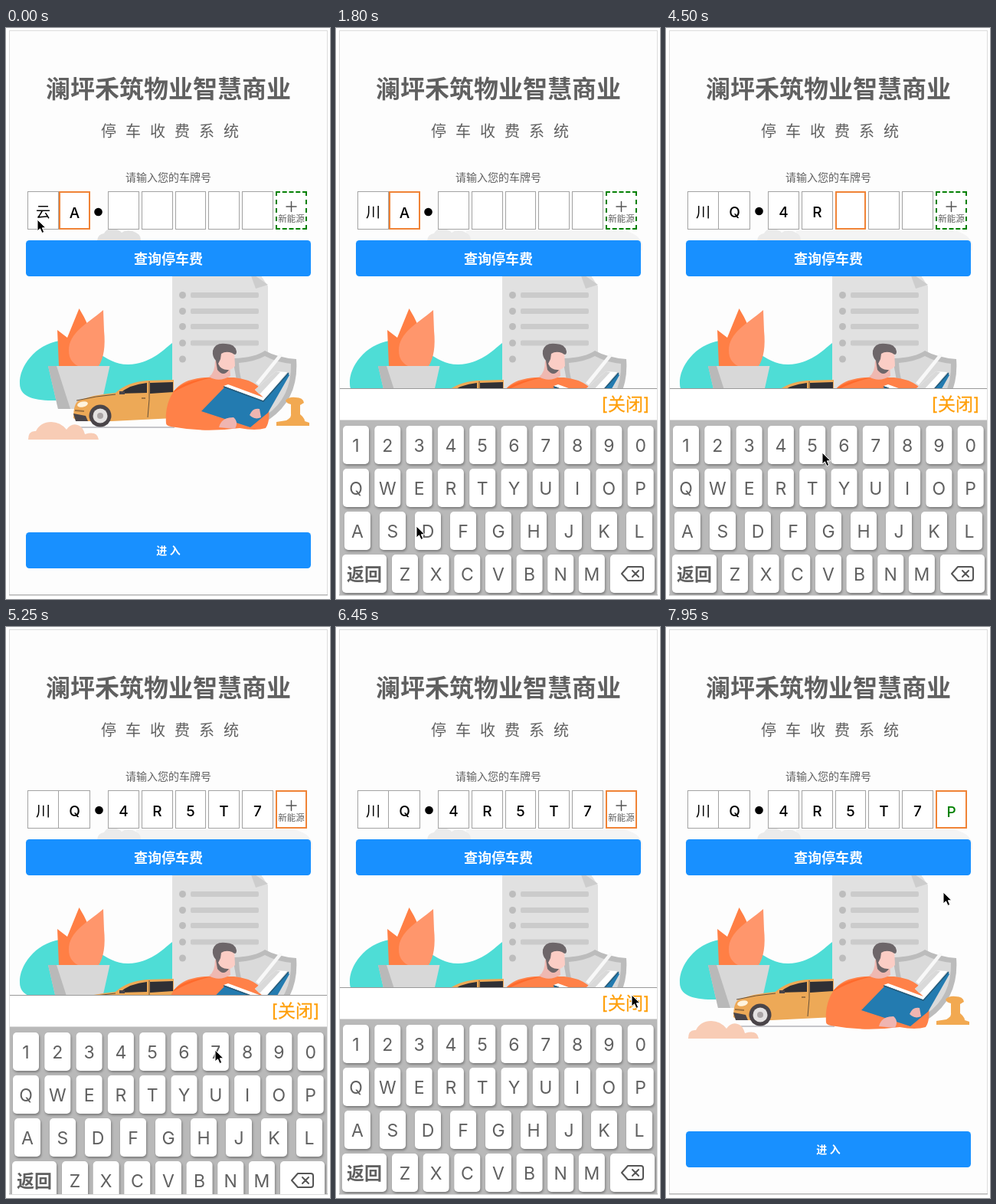
Animation of 423 by 745 pixels, one loop 8 s. Source, as an HTML page:

```html
<!DOCTYPE html>
<html lang="zh-CN">
<head>
<meta charset="utf-8">
<title>停车收费系统</title>
<style>
html, body { margin: 0; width: 100%; height: 100%; overflow: hidden; background: #fff; }
svg { display: block; width: 423px; height: 745px; }
text { font-family: Inter, "Noto Sans CJK SC", "Noto Sans CJK", sans-serif; text-anchor: middle; fill: #606060; }
.keys rect { fill: #fff; filter: drop-shadow(1px 2px 1.5px #0005); }
.icon { fill: none; stroke: #555; stroke-width: 2; stroke-linejoin: round; stroke-linecap: round; }
.cell { box-sizing: border-box; height: 50px; border: 1px solid #a3a3a3; background: #fff; }
.second { border-left: 0; }
.extra { border: 2px dashed green; }
.active { border: 2px solid #f08336; }
</style>
</head>
<body>
<svg viewBox="0 0 423 745">
  <defs><clipPath id="stage"><rect x="5" y="4" width="414" height="736"/></clipPath></defs>
  <rect x="4.5" y="3.5" width="415" height="737" fill="#fdfdfd" stroke="#dcdcdc"/>
  <path d="M4 739.500H420" stroke="#b4b4b4"/>

  <g id="art">
    <path id="haze" fill="#f4f4f4" d="M170 277V264H375Q395 268 400 282V290H170Z"/>
    <path id="cloud" d="M119 277q1-8 9-9q3-7 12-6q8 1 11 5q5-4 14-2q11 3 11 12z"/>
    <path fill="#4eddd6" d="M18 464C17 442 38 413 70 408C112 406 128 440 160 439C188 438 203 422 217 411V486H60C34 486 18 480 18 464Z"/>
    <!-- plant -->
    <path fill="#ff7f45" d="M69 441L67 394L80 404L95.500 366Q109 388 111 402V441Z"/>
    <path fill="#ff966c" d="M127 368C106 386 82 397 82 421Q82 435 94 441H121Q131 425 128 395Z"/>
    <path fill="#d8d8d8" d="M55 441H135.500L123 497H68Z"/>
    <path fill="#b9b9b9" d="M55 441H66L84 497H68Z"/>
    <!-- document -->
    <path fill="#e1e1e1" d="M217 300H318L342 337V480H217Z"/>
    <path fill="#cdcdcd" d="M318 318L326 340L342 335Z"/>
    <g id="list"></g>
    <!-- shield -->
    <path fill="#bcbcbc" d="M297 431Q325 430 338 421Q354 430 379 432Q383 486 340 513Q300 490 297 431Z"/>
    <path fill="#dadada" d="M304 437Q326 435 338 428Q353 436 372 438Q373 482 340 505Q306 484 304 437Z"/>
    <path fill="#f8f8f8" d="M357 425L361 427L330 466L326 463Z"/>
    <!-- car -->
    <path stroke="#c5c5ca" stroke-width="2" d="M94 521H220"/>
    <path fill="#eda957" d="M88 509Q88 490 95 486Q116 478 143 476Q158 462 184 460L219 459V509L138 513H94Z"/>
    <path fill="#303035" d="M148 477Q162 465 184 463V476ZM188 463L218 462V475L188 477Z"/>
    <path fill="none" stroke="#67513a" d="M187 461Q188 485 185 508M92 486Q118 480 143 478"/>
    <path fill="#4a4549" d="M88 503L104 506L107 513H91ZM148 478h7v-4h-7z"/>
    <ellipse cx="100" cy="491" rx="7" ry="3.500" fill="#fff3dd" transform="rotate(-12 100 491)"/>
    <path stroke="#9e713e" stroke-width="2" d="M177 483h5M90 499l12 1"/>
    <circle cx="123" cy="506" r="14.500" fill="#4a4549"/>
    <circle cx="123" cy="506" r="9.500" fill="#e3e1e1"/>
    <circle cx="123" cy="506" r="4" fill="#aaa5a6"/>
    <!-- reader -->
    <path fill="#ff8148" d="M209 516C207 486 220 464 242 459Q258 455 270 456L298 456Q336 460 342 490Q346 512 339 522Q326 526 305 522Q260 528 222 521Q209 520 209 516Z"/>
    <path fill="#ff6a2b" d="M217 476Q230 460 268 456Q240 463 217 476Z"/>
    <path fill="#efb8b1" d="M273 434L292 440L293 454Q278 463 265 455Q273 450 273 434Z"/>
    <path fill="#fbcdc5" d="M277 420L298 421L299 441Q293 449 282 445Q274 439 277 420Z"/>
    <path fill="#6d6669" d="M270 421Q273 410 287 412Q299 412 301 422Q301 429 295 424Q287 421 281 425L280 432L277 438Q281 447 291 446Q284 456 276 446L274 434Q269 429 270 421Z"/>
    <path fill="#fff" d="M284 467L290 465L336 482L325 472L352 448L367 449L336 487Z"/>
    <path fill="#d9d9d9" d="M325 472L352 448L358 449L331 478Z"/>
    <path fill="#237bb0" d="M255 500L286 468L336 487L368 450L370 453L342 502L319 521Z"/>
    <path fill="none" stroke="#255c7c" stroke-width="1.500" d="M284 468L336 487L369 450"/>
    <path fill="#efb5b1" d="M278 521Q281 508 297 508Q304 514 299 523ZM318 505Q322 495 331 497L333 508Q325 512 318 505Z"/>
    <!-- stool and hills -->
    <path fill="#f2a951" d="M365 486Q369 481 378 482Q388 482 389 489L384 492V504Q390 509 390 513L396 515V519H353V514L366 512Q373 508 372 504V491Q366 490 365 486Z"/>
    <path fill="#f8ccb5" d="M29 537Q29 525 39 526Q45 514 59 514Q71 514 79 524Q86 514 96 519Q101 522 103 530Q119 525 121 537Z"/>
  </g>

  <g id="copy"></g>
  <g id="plate"></g>
  <g clip-path="url(#stage)">
    <g id="board">
      <rect x="5" y="470" width="414" height="42" fill="#fff"/>
      <path d="M5 470.500H419" stroke="#999"/>
      <rect x="5" y="511.500" width="414" height="229" fill="#b9b9b9"/>
      <g id="provinces" class="keys"></g>
      <g id="letters" class="keys"></g>
    </g>
  </g>
  <path id="pointer" d="M0 0V15L3.500 11.800L6 17.500L8.700 16.300L6.300 10.800H11Z" fill="#000" stroke="#fff"/>
</svg>
<script>
const $ = id => document.getElementById(id);
const label = (s, x, y, size, attrs = '') =>
  `<text x="${x}" y="${y + size * .37}" font-size="${size}" ${attrs}>${s}</text>`;

// Static copy
const button = (s, y, size) =>
  `<rect x="26" y="${y}" width="372" height="47" rx="4.5" fill="#1890ff"/>` +
  label(s, 212, y + 24, size, 'style="fill:#fff" font-weight="700"');
$('copy').innerHTML =
  label('澜坪禾筑物业智慧商业', 212, 79, 32, 'font-weight="700"') +
  label('停车收费系统', 220, 135, 20, 'letter-spacing="12"') +
  label('请输入您的车牌号', 212, 195, 14) +
  button('查询停车费', 277, 18) + button('进 入', 658, 14);
$('list').innerHTML = [348.5, 369.5, 389.5, 411, 432].map((y, i) =>
  `<circle cx="230.500" cy="${y}" r="4.500" fill="#bdbdbd"/>` +
  (i < 4 ? `<rect x="241" y="${y - 3.5}" width="89" height="7" rx="2" fill="#cbcbcb"/>` : '')).join('');

// Keyboards
const key = (s, x, y, w = 34, attrs = '') =>
  `<rect x="${x - w / 2}" y="${y}" width="${w}" height="50" rx="5"/>` + label(s, x, y + 25.5, 23, attrs);
const row = (chars, y, x, pitch) => [...chars].map((c, i) => key(c, x + i * pitch, y)).join('');
const erase = (x, w) => key('', x, 687, w) +
  `<path class="icon" transform="translate(${x} 712)" d="M-6-9H11Q14-9 14-6V6Q14 9 11 9H-6L-14 0ZM0-4L8 4M8-4L0 4"/>`;
$('provinces').innerHTML =
  row('京沪粤津冀晋蒙辽吉黑', 519, 26, 41.3) + row('苏浙皖闽赣鲁豫鄂湘桂', 575, 26, 41.3) +
  row('琼渝川贵云藏陕甘青宁', 631, 26, 41.3) + row('新使警学港澳', 687, 103, 43.6) +
  key('ABC', 43, 687, 66, 'font-weight="700"') + erase(381, 66);
$('letters').innerHTML =
  row('1234567890', 519, 26, 41.3) + row('QWERTYUIOP', 575, 26, 41.3) +
  row('ASDFGHJKL', 631, 28, 46) + row('ZXCVBNM', 687, 90, 40.65) +
  key('返回', 37, 687, 58, 'font-weight="700"') + erase(387, 58);
$('board').insertAdjacentHTML('beforeend',
  label('[关闭]', 378, 490.5, 23, 'style="fill:#ff9f0a;stroke:#ff9f0a;stroke-width:.3"'));

// Plate cells
const cellWidth = 40.7;
const cellLeft = i => i < 2 ? 28 + i * 41 : 133.1 + (i - 2) * 43.77;
function cell(i, value, focus) {
  const active = i === focus, extra = i === 7 && !value;
  const left = Math.round(cellLeft(i)), width = Math.round(cellLeft(i) + cellWidth) - left;
  const kind = active ? 'active' : extra ? 'extra' : i === 1 ? 'second' : '';
  const box = `<foreignObject x="${left}" y="213" width="${width}" height="50">
    <div xmlns="http://www.w3.org/1999/xhtml" class="cell ${kind}"></div></foreignObject>`;
  if (extra) return box + '<path class="icon" style="stroke-width:1.5" d="M366 233H379M372.500 226.500V239.500"/>' +
    label('新能源', 372.5, 249, 11.5);
  return box + label(value || '', left + width / 2, active ? 240.5 : 239.5, 19,
    `font-weight="500" style="fill:${i === 7 ? 'green' : '#000'}"`);
}
function drawPlate(value, focus) {
  const [x, y] = focus === 1 ? [120.5, 240] : [121.5, 239];
  $('plate').innerHTML = Array.from({ length: 8 }, (_, i) => cell(i, value[i], focus)).join('') +
    `<circle cx="${x}" cy="${y}" r="5.300"/>`;
}

// Timeline: time, plate, focused cell
const edits = [
  [0, '云A', 1], [450, '云A', 0], [1650, '川A', 1], [2850, '川Q', 2], [3600, '川Q4', 3],
  [4050, '川Q4R', 4], [4800, '川Q4R5', 5], [5100, '川Q4R5T', 6], [5250, '川Q4R5T7', 7], [7200, '川Q4R5T7P', 7]
];
// Pointer: time, x, y
const path = [
  [0, 41, 250], [450, 41, 250], [750, 86, 292], [1050, 101, 520], [1350, 106, 648], [1800, 105, 650],
  [2400, 105, 651], [2700, 25, 600], [2850, 25, 600], [3150, 170, 570], [3450, 150, 548], [3600, 150, 548],
  [3900, 150, 610], [4050, 150, 610], [4350, 204, 554], [4800, 204, 554], [5100, 186, 602], [5250, 273, 552],
  [5550, 408, 260], [5700, 404, 176], [6000, 372, 238], [6150, 372, 238], [6450, 386, 480], [6750, 395, 600],
  [7200, 395, 604], [7500, 385, 575], [7800, 361, 518], [7950, 362, 346]
];
const clamp = p => Math.min(1, Math.max(0, p));
const rise = (t, start) => 1 - (1 - clamp((t - start) / 436)) ** 3;
function fall(t, start) {
  const p = clamp((t - start) / 451);
  return p * p * (3 - 2 * p);
}
function pointerAt(t) {
  const n = path.findIndex(k => k[0] >= t);
  if (n < 1) return path[0].slice(1);
  const a = path[n - 1], b = path[n], p = (t - a[0]) / (b[0] - a[0]);
  return [a[1] + (b[1] - a[1]) * p, a[2] + (b[2] - a[2]) * p];
}

let shown = -1;
function frame(now) {
  const t = Math.floor(now % 8000 / 150) * 150;
  if (t !== shown) {
    shown = t;
    const [, value, focus] = edits.findLast(e => e[0] <= t);
    drawPlate(value, focus);
    const open = rise(t, 500) - fall(t, 5198) + rise(t, 6050) - fall(t, 7148);
    $('board').setAttribute('transform', `translate(0 ${Math.round(270 * (1 - open))})`);
    $('provinces').style.display = t < 1650 ? '' : 'none';
    $('letters').style.display = t < 1650 ? 'none' : '';
    $('haze').style.display = t < 450 ? 'none' : '';
    $('cloud').setAttribute('fill', t < 450 ? '#e1e1e1' : '#ebebeb');
    $('pointer').setAttribute('transform', `translate(${pointerAt(t).map(Math.round)})`);
  }
  requestAnimationFrame(frame);
}
frame(performance.now());
</script>
</body>
</html>
```
